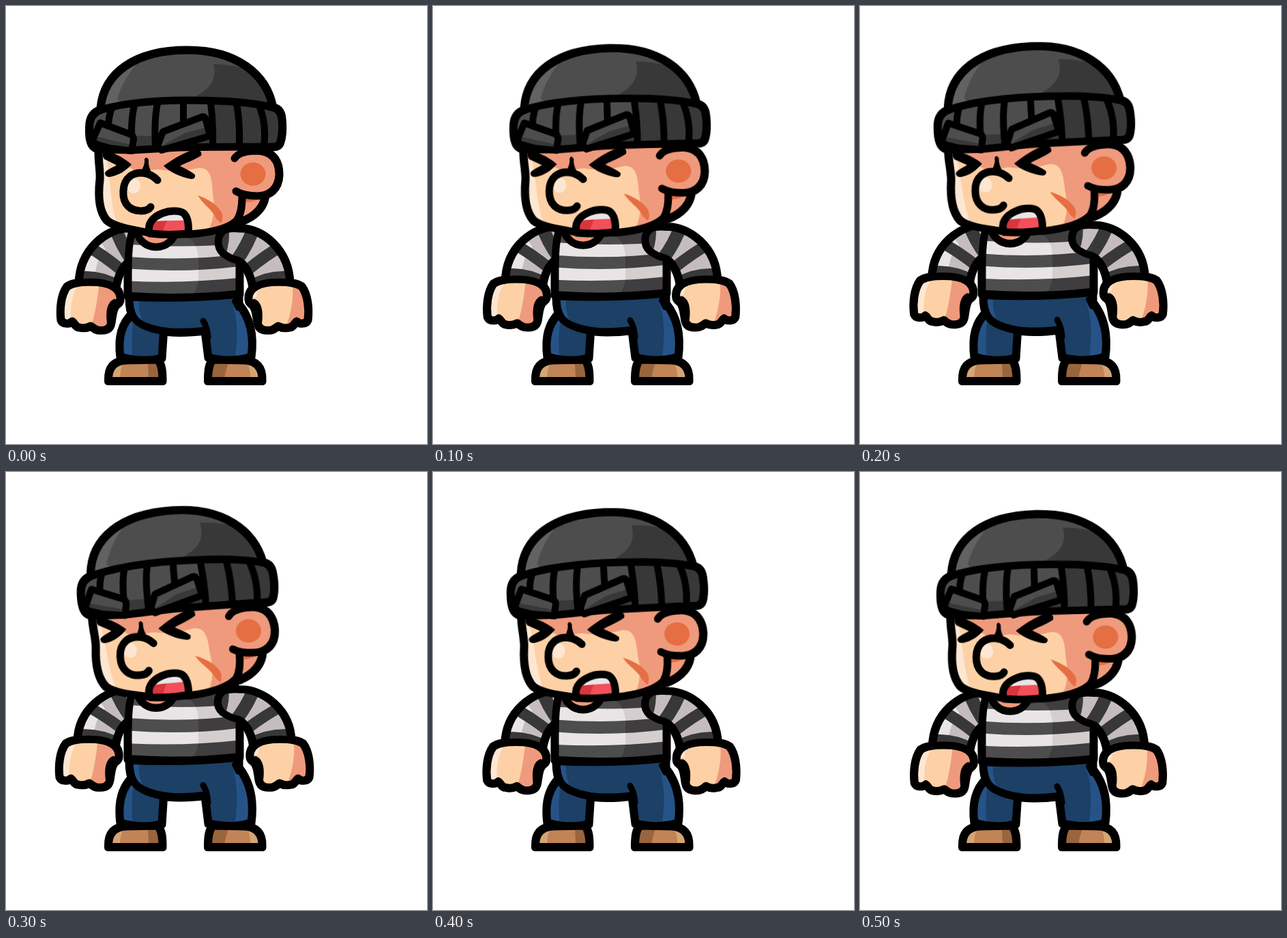
These frames come from a looping animation (617 by 641 pixels, 0.6 s). An HTML page:

```html
<!DOCTYPE html>
<html lang="en">
<head>
<meta charset="utf-8">
<title>Angry burglar</title>
<style>
html, body { margin: 0; width: 100%; height: 100%; overflow: hidden; background: #fff; }
svg { display: block; width: 100vw; height: 100vh; --k: 0; }
path { fill: none; }
.line { stroke: #000; stroke-width: 11; stroke-linecap: round; stroke-linejoin: round; }
/* --k runs from 0 (crouched) to 1 (raised) */
.head { transform: matrix(1, calc(var(--k) * -.065), calc(var(--k) * .083), calc(1 + var(--k) * .006), calc(var(--k) * -27), calc(var(--k) * 8.6)); }
.body { transform: matrix(1, 0, 0, calc(1 + var(--k) * .046), 0, calc(var(--k) * -23.7)); }
.arm { transform: matrix(calc(1 + var(--k) * .025), 0, 0, calc(1 - var(--k) * .07), calc(var(--k) * -4.5), calc(var(--k) * 15.5)); }
.hand { transform: translate(calc(var(--k) * -2px), calc(var(--k) * -13px)); }
</style>
</head>
<body>
<svg viewBox="0 0 617 641"></svg>
<script>
const svg = document.querySelector('svg');
const skin = '#fdd1a5', pale = '#fde7d2', blush = '#ef9a7b', rust = '#e56e42';
const grey = '#4d4d4d', dark = '#373737', white = '#e9e5e7', mist = '#c4bcbf';
const navy = '#1f3f66', blue = '#275287';
let ids = 0;

const fill = (d, color) => `<path d="${d}" style="fill:${color}"/>`;
const line = (d, width = 11) => `<path class="line" d="${d}" style="stroke-width:${width}"/>`;
const band = (d, width, color) => `<path d="${d}" stroke="${color}" stroke-width="${width}"/>`;
const oval = (x, y, rx, ry, color) => `<ellipse cx="${x}" cy="${y}" rx="${rx}" ry="${ry}" fill="${color}"/>`;
const group = (name, content) => `<g class="${name}">${content}</g>`;
const mirror = (content, width = 523) => `<g transform="matrix(-1 0 0 1 ${width} 0)">${content}</g>`;

// A filled shape with details clipped to it and an outline on top
function shape(d, color, details = '', outline = d, width = 11) {
  const id = 'c' + ids++;
  return `<clipPath id="${id}"><path d="${d}"/></clipPath>` + fill(d, color) +
    `<g clip-path="url(#${id})">${details}</g>` + line(outline, width);
}

function foot(left) {
  const toe = fill('M145,555V515H177C168,525 167,535 167,555Z', '#d6a574');
  const heel = fill(left ? 'M235,555V515H207Q209,530 209,555Z' : 'M235,555V515H197C202,530 206,540 206,555Z', '#99653d');
  return shape('M150.5,548.5C150,528 160,520 176,519L222,518C228,525 229,535 229,548.5Z', '#c08457', toe + heel);
}

function arm(left) {
  const d = 'M178,326C150,326 108,355 107,408L161,412C163,395 172,376 184,372C195,370 200,365 205,362C215,352 214,335 203,328C195,324 186,326 178,326Z';
  const light = left ? fill('M100,420V360L134,338L146,356C134,368 130,385 129,415Z', white) : '';
  const stripes = band('M205,322Q201,345 212,370', 16, dark) +
    band('M160,323Q167,347 186,374', 19, dark) +
    band('M120,352Q142,364 171,388', 17, dark) +
    band('M104,397Q135,392 166,410', 16, dark);
  return group('arm', shape(d, mist, light + stripes));
}

function hand(left) {
  const d = 'M90,411C103,402 143,402 157,411C168,418 170,431 163,436C156,440 156,452 154,463C152,474 143,475 135,474C129,473 127,469 124,468C120,470 114,472 108,470C102,470 101,463 97,461C93,465 84,466 81,459C79,444 81,423 90,411Z';
  const shade = left
    ? fill('M75,440C74,420 80,405 112,403C98,416 94,432 95,465H75Z', pale) +
      fill('M138,400C134,420 134,445 121,480H175V400Z', blush)
    : fill('M170,400H138C146,409 154,410 156,426L175,432Z', pale) +
      fill('M105,400C100,420 103,445 116,480H70V400Z', blush);
  return group('hand', shape(d, skin, shade) + line('M152,464C150,449 152,437 159,433', 8));
}

function body() {
  const leg = shape('M186,450C170,465 164,485 168,513Q198,522 228,515L231,470Z', navy,
    fill('M160,440H192C184,465 183,490 186,525H160Z', blue));
  const hips = shape('M181,426C181,455 190,463 205,469C225,477 250,480 292,475L297,514Q330,522 359,513C363,485 358,458 341,437V422Q260,430 181,426Z', navy,
    fill('M175,420H196C193,440 195,455 207,472L175,470Z', blue) +
    fill('M330,430C341,460 340,490 334,525H370V430Z', blue)) +
    line('M289,461Q295,470 296,485', 9) + line('M335,432L340,442', 8);
  const shirt = shape('M187,322C180,345 179,360 179,395V424Q260,430 342,421V365L335,322Z', white,
    fill('M170,320H350V346Q275,356 170,348Z', grey) +
    band('M170,375Q265,383 350,371', 17.5, grey) +
    band('M170,411Q265,416 350,406', 18, grey) +
    '<path d="M268,340Q283,350 282,375V400Q281,414 270,430H350V320H250Z" style="fill:#d4cecf;mix-blend-mode:multiply"/>');
  const neck = shape('M190,325C195,362 245,362 250,325Z', blush);
  return group('body', leg + hips + shirt + neck);
}

function face() {
  const nape = shape('M380,270C381,294 363,309 342,316L344,272Z', blush,
    fill('M340,286Q360,290 374,280V265H340Z', rust));
  const jaw = 'M136,212C136,232 139,240 138,255C135,280 138,301 148,313C160,324 190,328 215,333L268,334C300,332 325,326 338,314C345,304 346,292 346,279';
  const skinShade =
    fill('M130,225H147C154,250 151,290 166,330H130Z', pale) +
    fill('M130,195H370V340H290C304,320 307,300 303,275C302,250 299,236 282,237C260,242 245,242 229,240C214,236 202,247 190,242C178,234 160,220 130,222Z', blush);
  const scar = fill('M281,277C297,283 309,290 316,302Q319,310 315,318L308,311C302,297 290,292 281,277Z', rust);
  const ear = fill('M334,223C342,211 375,205 393,222C404,240 402,262 392,271C378,282 353,281 337,271Z', blush) +
    oval(362, 246, 18.5, 17, rust) +
    line('M335,223C341,214 354,212 368,212C394,213 400,232 400,247C399,268 385,278 368,278C354,278 345,276 337,271');
  const eyes = fill('M184,232C172,221 155,213 143,212Q140,219 144,224C152,228 158,231 162,233C155,237 148,239 145,244Q145,251 153,250C165,248 176,241 184,232Z', '#000') +
    fill('M231,234C245,224 265,211 280,210Q288,212 286,219C275,226 262,230 255,234C262,238 272,242 277,247Q278,254 270,253C255,250 240,243 231,234Z', '#000');
  const nose = fill('M222,257C210,241 187,241 177,256C168,272 171,294 187,300C200,304 210,298 213,293L225,275Z', skin) +
    oval(187, 263, 10, 11, pale) +
    line('M222,255C211,243 193,241 182,249C169,259 169,283 179,293C188,302 207,302 212,294') +
    fill('M197,243Q204,233 203,224Q206,219 209,225Q208,235 214,245Z', '#000');
  const mouth = shape('M211,333C206,320 214,309 230,303C240,299 254,299 260,303C267,309 268,322 267,333Q240,336 211,333Z', '#d9343c',
    fill('M227,340Q231,322 238,312H275V340Z', '#f2505a') +
    fill('M205,316V295H272V314Q240,313 205,316Z', white));
  return nape + shape(jaw + 'L360,200H136Z', skin, skinShade, jaw) + scar + ear + eyes + nose + mouth;
}

function hat() {
  const dome = shape('M139,150C144,98 190,65 266,65C337,65 382,100 391,150Z', grey,
    fill('M135,145L150,90L215,65C185,85 172,110 163,135L170,145Z', '#626262') +
    fill('M304,85Q340,85 375,102L395,150H240C280,131 313,122 304,85Z', dark));
  const ribs = ['M155,149Q150,163 150,178', 'M188,146Q182,170 185,207', 'M222,143Q217,165 219,205',
    'M260,141V175', 'M300,142Q304,175 303,206', 'M338,143Q343,170 342,205', 'M372,148Q382,175 378,205'];
  const brim = shape('M137,153C155,146 200,138 265,138C325,138 368,142 392,149Q403,152 404,166Q406,185 402,198Q400,206 390,206Q320,206 255,207L185,211L140,210Q130,209 126,202Q121,192 123,172Q125,158 137,153Z', grey,
    fill('M120,214V195Q210,186 299,193V135H415V215Z', dark)) + ribs.map(d => line(d, 10)).join('');
  const brows =
    shape('M138,171L183,188Q187,190 187,195L184,212L152,208L131,202L127,196Z', grey,
      fill('M120,188L195,206V218H120Z', dark), undefined, 10) +
    shape('M230,184L288,162Q292,162 293,167L299,190L262,201L228,211L222,205Z', grey,
      fill('M220,209L262,186L300,176V195L225,220Z', dark), undefined, 10);
  return dome + brim + brows;
}

// The filter thickens the silhouette by a hard-edged pixel
svg.innerHTML = `<filter id="rim">
    <feMorphology in="SourceAlpha" operator="dilate" radius="1" result="edge"/>
    <feMerge><feMergeNode in="edge"/><feMergeNode in="SourceGraphic"/></feMerge>
  </filter>
  <g filter="url(#rim)">` + foot(true) + mirror(foot(false), 525.5) + arm(true) + hand(true) + body() +
  mirror(arm(false) + hand(false)) + group('head', face() + hat()) + '</g>';

// The breathing is stepped: ten poses a second, up and down again
function draw(now) {
  const step = Math.floor(now / 100) % 6;
  svg.style.setProperty('--k', 1 - Math.abs(step - 3) / 3);
  requestAnimationFrame(draw);
}
draw(performance.now());
</script>
</body>
</html>
```
